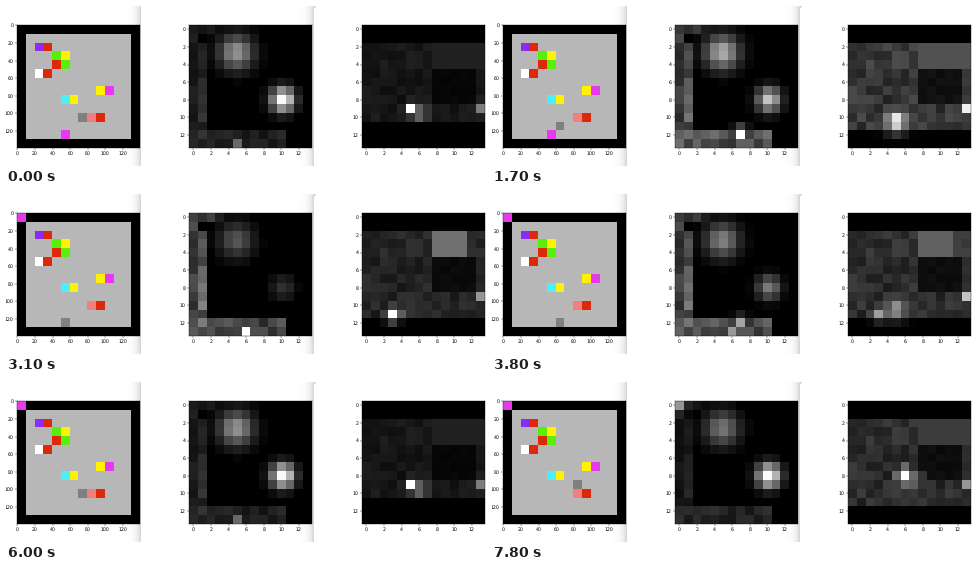
Write a matplotlib script that moves like this. It is 480 px wide and 160 px high and loops after 8000 ms.

```python
import numpy as np
import matplotlib.pyplot as plt
from matplotlib.animation import FuncAnimation

W, H, DPI = 480, 160, 100
SCALE = 1 / 3          # windows are shown at a third of their natural size
N = 14                 # cells per side
SIDE, TOP = 123, 19    # whole pixels keep the cell edges in place
FRAME_MS, LOOP_MS = 100, 8000

plt.rcParams.update({
    "font.family": "DejaVu Sans",
    "font.size": 10 * SCALE,
    "axes.linewidth": 0.8 * SCALE,
    "text.hinting": "none",
})

# ---------------------------------------------------------------- grid world
COLORS = {
    "red": (221, 40, 10), "green": (88, 240, 8), "yellow": (255, 242, 0),
    "magenta": (232, 56, 240), "cyan": (75, 240, 252), "pink": (240, 128, 128),
    "purple": (139, 44, 245), "white": (255, 255, 255),
    "floor": (183, 183, 183), "agent": (128, 128, 128),
}

# each pair of neighbours is named by its left cell
PAIRS = {
    (2, 2): "purple red", (4, 3): "green yellow", (4, 4): "red green",
    (2, 5): "white red", (9, 7): "yellow magenta", (5, 8): "cyan yellow",
    (8, 10): "pink red",
}


def world(agent, key):
    grid = np.zeros((N, N, 3), np.uint8)
    grid[1:-1, 1:-1] = COLORS["floor"]
    for (col, row), names in PAIRS.items():
        grid[row, col:col + 2] = [COLORS[n] for n in names.split()]
    grid[key[::-1]] = COLORS["magenta"]
    grid[agent[::-1]] = COLORS["agent"]
    return grid


# ------------------------------------------------------------ attention maps
ROW, COL = np.mgrid[0:N, 0:N]
GRAIN = 1 + 0.4 * np.random.default_rng(4).uniform(-1, 1, (N, N))


def glow(col, row, level, spread):
    dist2 = (COL - col) ** 2 + (ROW - row) ** 2
    return level * np.exp(-dist2 / (2 * spread ** 2))


def box(c0, c1, r0, r1):
    """Mask of the cells from c0 to c1 and r0 to r1, both included."""
    return (COL >= c0) & (COL <= c1) & (ROW >= r0) & (ROW <= r1)


def middle(side, hill, spot, floor, peak, haze=0):
    """Left strip, two glowing areas and a bottom band with one bright cell."""
    strip = side * (0.6 * box(0, 0, 1, 13) + box(1, 1, 2, 13)
                    + 0.5 * box(0, 3, 0, 0))
    band = floor * box(0, 10, 12, 13)
    veil = haze * (1 + 1.5 * box(4, 13, 0, 1) + 2 * box(1, 3, 0, 7))
    grid = np.maximum(strip, band) * GRAIN + veil * GRAIN
    for light in (glow(4.9, 2.6, hill, 1.35), glow(10.2, 8, spot, 0.95),
                  glow(*peak, 0.6)):
        grid = np.maximum(grid, light)
    return np.where(grid < 6, 0, grid)


def right(body, plate, focus, spread, corner, plate_end=13, last_row=11):
    """Textured field with a flat plate, a dark hole and a bright focus."""
    grid = body * GRAIN * box(0, 13, 2, last_row)
    grid[box(8, 12, 5, 8)] *= 0.3
    grid[box(8, plate_end, 2, 4)] = plate
    trail = glow(focus[0] + 1, focus[1] + 0.5, 110, 0.9)
    trail *= box(0, 13, 2, last_row)
    for light in (trail, glow(*focus, 255, spread), glow(13, 9, corner, 0.6)):
        grid = np.maximum(grid, light)
    return grid


MAPS = {
    "far": (middle(40, 150, 255, 30, (5, 13, 105)),
            right(22, 32, (5, 9), 0.5, 125, last_row=10)),
    "near": (middle(62, 165, 255, 50, (6, 13, 95)),
             right(30, 42, (4.5, 9), 0.6, 160, last_row=10)),
    "above": (middle(85, 175, 200, 80, (7, 12, 255)),
              right(55, 82, (5, 10.4), 0.9, 240)),
    "beside": (middle(50, 0, 0, 190, (11, 12.5, 230), haze=30),
               right(78, 92, (6, 11.2), 0.6, 230)),
    "on": (middle(95, 88, 50, 65, (6, 13, 255)),
           right(36, 112, (3, 11), 0.6, 150, plate_end=11)),
    "past": (middle(30, 120, 255, 35, (0, 0, 150)),
             right(44, 60, (6, 8), 0.75, 150)),
}


def mix(a, b):
    return tuple((p + q) / 2 for p, q in zip(MAPS[a], MAPS[b]))


MAPS["leaving"] = mix("on", "above")
MAPS["turning"] = mix("far", "past")

# start in ms, agent cell, attention maps
STEPS = [
    (0, (7, 10), "far"),
    (700, (6, 10), "near"),
    (1700, (6, 11), "above"),
    (2400, (6, 12), "beside"),
    (3000, (5, 12), "on"),
    (3800, (6, 12), "leaving"),
    (4600, (6, 11), "above"),
    (5300, (6, 10), "near"),
    (6000, (7, 10), "far"),
    (6700, (7, 9), "turning"),
    (7500, (8, 9), "past"),
]
PICKUP_MS = 3000

# --------------------------------------------------------------------- stage
fig = plt.figure(figsize=(W / DPI, H / DPI), dpi=DPI, facecolor="white")


def backdrop():
    """White windows, each casting a soft shadow on the one to its left."""
    y, x = np.mgrid[0:H, 0:W] + 0.5
    shade = np.ones((H, W))
    radius = 3
    for left, top in ((135.3, -8), (308.3, 0)):
        dx = np.maximum(left + radius - x, 0)
        dy = np.maximum(top + radius - y, 0)
        gap = np.hypot(dx, dy) - radius
        shadow = 1 - 0.2 * np.exp(-np.maximum(gap, 0) / 4)
        shade = np.where(gap > 0, shade * shadow, 1)
    ax = fig.add_axes([0, 0, 1, 1], zorder=-1)
    ax.axis("off")
    ax.imshow(shade, cmap="gray", vmin=0, vmax=1, aspect="auto",
              interpolation="nearest")


def panel(left, size, tick_step):
    ax = fig.add_axes([left / W, 1 - (TOP + SIDE) / H, SIDE / W, SIDE / H])
    edge = size - 0.5
    image = ax.imshow(np.zeros((N, N)), cmap="gray", vmin=0, vmax=255,
                      extent=(-0.5, edge, edge, -0.5), aspect="auto",
                      interpolation="nearest")
    ticks = range(0, size, tick_step)
    ax.set_xticks(ticks)
    ax.set_yticks(ticks)
    ax.tick_params(length=3.5 * SCALE, width=0.8 * SCALE, pad=3.5 * SCALE)
    return image


backdrop()
views = [panel(11, 140, 20), panel(183, N, 2), panel(356, N, 2)]


def update(i):
    now = i * FRAME_MS
    _, agent, name = [s for s in STEPS if s[0] <= now][-1]
    key = (0, 0) if now >= PICKUP_MS else (5, 12)
    for view, data in zip(views, (world(agent, key), *MAPS[name])):
        view.set_data(data)
    return views


anim = FuncAnimation(fig, update, frames=LOOP_MS // FRAME_MS,
                     interval=FRAME_MS, repeat=True, repeat_delay=0)
plt.show()
```
